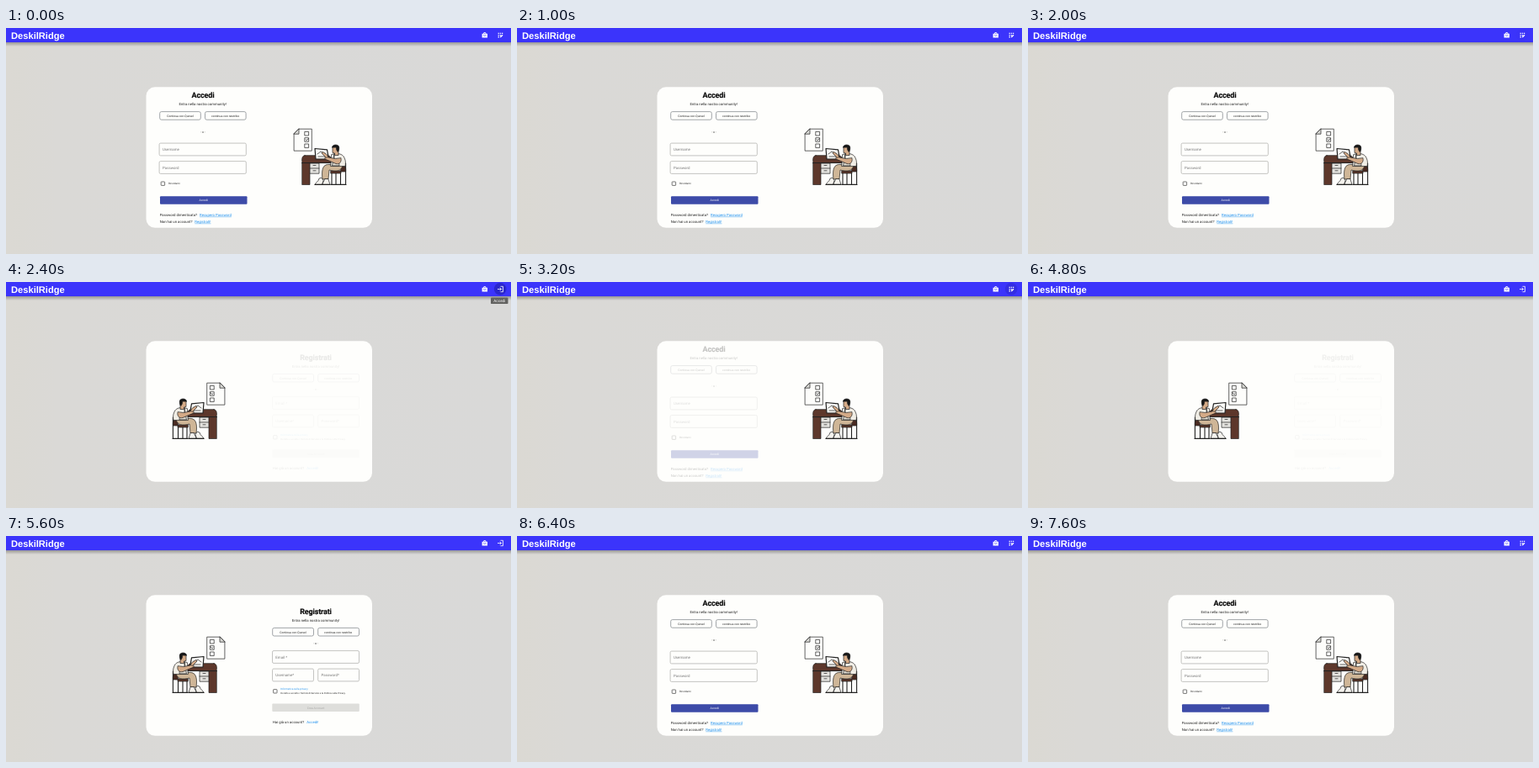
An HTML page that plays this animation: 600x269 px, repeating every 8000 ms.

```html
<!DOCTYPE html>
<html lang="it">
<head>
<meta charset="utf-8">
<title>Accesso</title>
<style>
  html, body { margin: 0; width: 100%; height: 100%; overflow: hidden; background: #dad9d7; }
  svg { display: block; width: 600px; height: 269px; }
  text { font-family: Roboto, Arial, sans-serif; text-rendering: geometricPrecision; fill: #222; }
  .brand { font: bold 11.15px "Liberation Sans", Arial, sans-serif; fill: #fff; }
  .title { font-size: 9px; font-weight: 700; letter-spacing: -.16px; fill: #0c0c0c; stroke: #0c0c0c; stroke-width: .15; }
  .mid { text-anchor: middle; }
  .body { font-size: 4.28px; }
  .btn { font-size: 3.45px; }
  .label { font-size: 4.4px; fill: #777; }
  .note { font-size: 3px; }
  .fine { font-size: 2.76px; }
  .link { fill: #1b8fee; }
  .line { text-decoration: underline; }
  .white { fill: #fff; }
  .pale { fill: #a9a9a6; }
  .box { fill: none; stroke: #b5b5b3; stroke-width: .8; }
  .pill { fill: none; stroke: #8a8f93; stroke-width: .8; }
  .check { fill: none; stroke: #555; stroke-width: .8; }
  .ink { stroke: #222; stroke-width: .7; stroke-linejoin: round; stroke-linecap: round; }
</style>
</head>
<body>
<svg viewBox="0 0 600 269">
  <defs>
    <linearGradient id="wall"><stop stop-color="#dbd9d3"/><stop offset=".1" stop-color="#dad9d6"/><stop offset="1" stop-color="#d9d9d8"/></linearGradient>
    <linearGradient id="shade" x2="0" y2="1"><stop stop-color="#000" stop-opacity=".3"/><stop offset="1" stop-color="#000" stop-opacity="0"/></linearGradient>
    <g id="art" class="ink" fill="none">
      <!-- checklist -->
      <path d="M348 120.2h15.3v26h-21.2v-20z" fill="#fdfdfb"/>
      <path d="M348 120.2v6h-5.9z" fill="#d8d8d4"/>
      <path d="M355.2 123.4h4.4v4.6h-4.4zM355.2 130.7h4.4v4.6h-4.4zM355.2 138h4.4v4.6h-4.4zM356.2 132.8l1 1.2 2-2.4"/>
      <!-- chair -->
      <path d="M386 170h12v3h-12z" fill="#5a3529"/>
      <path d="M387 173v13.4M397.5 173v13.4M403.6 161v25.4M392 173v13M386 186.4h18" stroke-width="1.1"/>
      <path d="M398 165c5-3 6 1 5.6 6h-6z" fill="#4a2b22"/>
      <!-- legs -->
      <path d="M400 163c-1 8-8 8-16 6l-1 11h-7c-1-8-1-17 6-17.500z" fill="#cfb697"/>
      <path d="M383 180l2 6.400h-9c0-2.600 2-3.500 2.500-6.400zM375 178.500l2 3-1.500 4.900h-8.500c1-3 4-3 5-7z" fill="#f5f3ee"/>
      <path d="M367 186.400h18" stroke-width="1.1"/>
      <!-- desk -->
      <path d="M361 161h11v12.200h-11z" fill="#e4e3df"/>
      <path d="M361 167h11M365 163.500h3M365 169.800h3"/>
      <path d="M352 160.500h9v26h-9z" fill="#5d372b"/>
      <path d="M355 151.700h27c4 0 5 4 4 8.800h-34c-1-5 0-8.800 3-8.800z" fill="#5d372b"/>
      <path d="M351.500 160.600h35" stroke-width="1"/>
      <!-- torso -->
      <path d="M387 150.500c7-2 13-1 15 4 2 4 1.500 7 1 10h-17z" fill="#f0ede5"/>
      <path d="M390 150v6c4 1.500 6 3 6 8h-8z" fill="#d9d5ca"/>
      <!-- tablet and arms -->
      <path d="M367 143.500l14.500 1.300 2 11-15.500.2z" fill="#fafaf7" stroke-width="1.2"/>
      <path d="M370 150l4-3 3 2M371 153h7"/>
      <path d="M398 155c1 5-2 7.500-6 6.500l-13-5.500 0-4 3-.5 1 2.500 8 1.500z" fill="#d4aa87"/>
      <path d="M380 154l-5-5 1-1.500 4 2 3 3.500z" fill="#d4aa87"/>
      <!-- head -->
      <path d="M388 142v6.500l2.500.5v2.500h4.500v-6l0-5-6 0z" fill="#d4aa87"/>
      <path d="M387.500 142c0-4 8-4 8.200 0 .2 3-.5 4.500-1.500 5.500l-1.500-2.500-.3-2.800z" fill="#161616"/>
    </g>
  </defs>

  <rect width="600" height="269" fill="url(#wall)"/>
  <rect y="17" width="600" height="5" fill="url(#shade)"/>
  <rect width="600" height="17" fill="#3b34fb"/>
  <text class="brand" x="6" y="12.500">DeskilRidge</text>
  <path d="M565.600 6.800h1.500a1.700 1.700 0 0 1 3.400 0h1.500v4.800h-6.400z" fill="#fff"/>
  <path d="M567.200 8.200a1.700 1.700 0 0 0 3.200 0M568 6.700h1.600" fill="none" stroke="#3b34fb" stroke-width=".7"/>
  <circle id="halo" cx="587.2" cy="8.400" r="7.300" fill="#1c1a9c" fill-opacity=".5"/>
  <path id="iconUp" fill="#fff" d="M584.600 5.700h1.300v1.300h-1.300zM586.800 5.700h1.300v1.300h-1.300zM589 5.700h1.300v1.300h-1.300zM584.600 7.900h1.300v1.300h-1.300zM586.800 7.900h1.300v1.300h-1.300zM584.600 10.100h1.300v1.300h-1.300zM587 10.200l2.500-2.500 1 1-2.500 2.600h-1z"/>
  <path id="iconIn" fill="none" stroke="#fff" stroke-width=".8" d="M587.500 5.300h3v6.400h-3M584 8.500h4.600M586.800 6.700l1.800 1.800-1.800 1.800"/>

  <rect x="166.500" y="70.300" width="268.500" height="167.500" rx="10.500" fill="#fefefc"/>

  <use id="artIn" href="#art"/>
  <g id="artUp"><use href="#art" transform="translate(602) scale(-1 1)"/></g>

  <g id="formIn">
    <text class="title mid" x="234" y="83">Accedi</text>
    <text class="body mid" x="233.700" y="92.400">Entra nella nostra community!</text>
    <rect class="pill" x="182.700" y="99.600" width="48.600" height="9.600" rx="2"/>
    <rect class="pill" x="236.500" y="99.600" width="48.600" height="9.600" rx="2"/>
    <text class="btn mid" x="207" y="105.800">Continua con Quovel</text>
    <text class="btn mid" x="260.600" y="105.800">continua con nestribo</text>
    <text class="btn mid" x="234" y="124.600">- o -</text>
    <rect class="box" x="182.100" y="137.100" width="103.200" height="14.800" rx="1.500"/>
    <rect class="box" x="182.100" y="158.600" width="103.200" height="14.800" rx="1.500"/>
    <text class="label" x="186" y="146.200">Username</text>
    <text class="label" x="186" y="167.700">Password</text>
    <rect class="check" x="184.200" y="183" width="4.400" height="4.400" rx=".5"/>
    <text class="note" x="193" y="186.200">Ricordami</text>
    <rect x="183" y="200.200" width="103.500" height="9.500" rx="1" fill="#3d4ba8"/>
    <text class="btn mid white" x="234.700" y="206.200">Accedi</text>
    <text class="body" x="182.700" y="223.700">Password dimenticata?</text>
    <text class="body link line" x="230" y="223.700">Recupero Password</text>
    <text class="body" x="182.700" y="231.700">Non hai un account?</text>
    <text class="body link line" x="224.300" y="231.700">Registrati!</text>
  </g>

  <g id="formUp">
    <text class="title mid" x="368" y="92.600">Registrati</text>
    <text class="body mid" x="368" y="101.800">Entra nella nostra community!</text>
    <rect class="pill" x="316.700" y="109.400" width="48.800" height="9.600" rx="2"/>
    <rect class="pill" x="370.700" y="109.400" width="48.800" height="9.600" rx="2"/>
    <text class="btn mid" x="341" y="115.600">Continua con Quovel</text>
    <text class="btn mid" x="394.700" y="115.600">continua con nestribo</text>
    <text class="btn mid" x="368" y="129">- o -</text>
    <rect class="box" x="316.500" y="136.600" width="103" height="14.800" rx="1.500"/>
    <rect class="box" x="316.500" y="158.100" width="49" height="14.800" rx="1.500"/>
    <rect class="box" x="370.700" y="158.100" width="48.800" height="14.800" rx="1.500"/>
    <text class="label" x="320.300" y="145.800">Email *</text>
    <text class="label" x="320.300" y="167.200">Username*</text>
    <text class="label" x="374.500" y="167.200">Password*</text>
    <rect class="check" x="317.600" y="182.600" width="4.400" height="4.400" rx=".5"/>
    <text class="note link" x="326" y="183.300">Informativa sulla privacy</text>
    <text class="fine" x="326" y="187.500">Ho letto e accetto i Termini di Servizio e la Politica sulla Privacy.</text>
    <rect x="316.300" y="199.600" width="103.500" height="9.500" rx="1" fill="#dededb"/>
    <text class="btn mid pale" x="368" y="205.600">Crea Account</text>
    <text class="body" x="316.800" y="223.200">Hai già un account?</text>
    <text class="body link" x="357.200" y="223.200">Accedi!</text>
  </g>

  <g id="tip">
    <rect x="576" y="18.400" width="20.500" height="7.700" rx="1.200" fill="#626260"/>
    <text class="mid white" x="586.300" y="23.900" font-size="4.700">Accedi</text>
  </g>
</svg>
<script>
  const LOOP = 8000;

  // steps: [time, opacity]; two steps at one time make a hard cut
  function track(id, steps) {
    const frames = [[0, steps[0][1]], ...steps, [LOOP, steps.at(-1)[1]]]
      .map(([t, opacity]) => ({ offset: t / LOOP, opacity, easing: 'ease-in-out' }));
    document.getElementById(id).animate(frames, { duration: LOOP, iterations: Infinity });
  }

  const cut = (t, on) => [[t, 1 - on], [t, on]];
  const fadeIn = (t, span) => [[t, 0], [t + span, 1]];
  const visits = [[2300, 3100], [4720, 6050]];   // sign-up page: enter, leave

  const signUp = visits.flatMap(([a, b]) => [...cut(a, 1), ...cut(b, 0)]);
  const signIn = visits.flatMap(([a, b]) => [...cut(a, 0), ...cut(b, 1)]);
  track('artUp', signUp);
  track('iconUp', signIn);
  track('artIn', signIn);
  track('iconIn', signUp);
  track('formUp', visits.flatMap(([a, b]) => [...fadeIn(a, 500), ...cut(b, 0)]));
  track('formIn', visits.flatMap(([a, b]) => [...cut(a, 0), ...fadeIn(b, 300)]));
  track('halo', [[1980, 0], [2100, 1], [3100, 1], [3300, 0]]);
  track('tip', [[2300, 0], [2380, 1], [2680, 1], [2780, 0]]);
</script>
</body>
</html>
```
